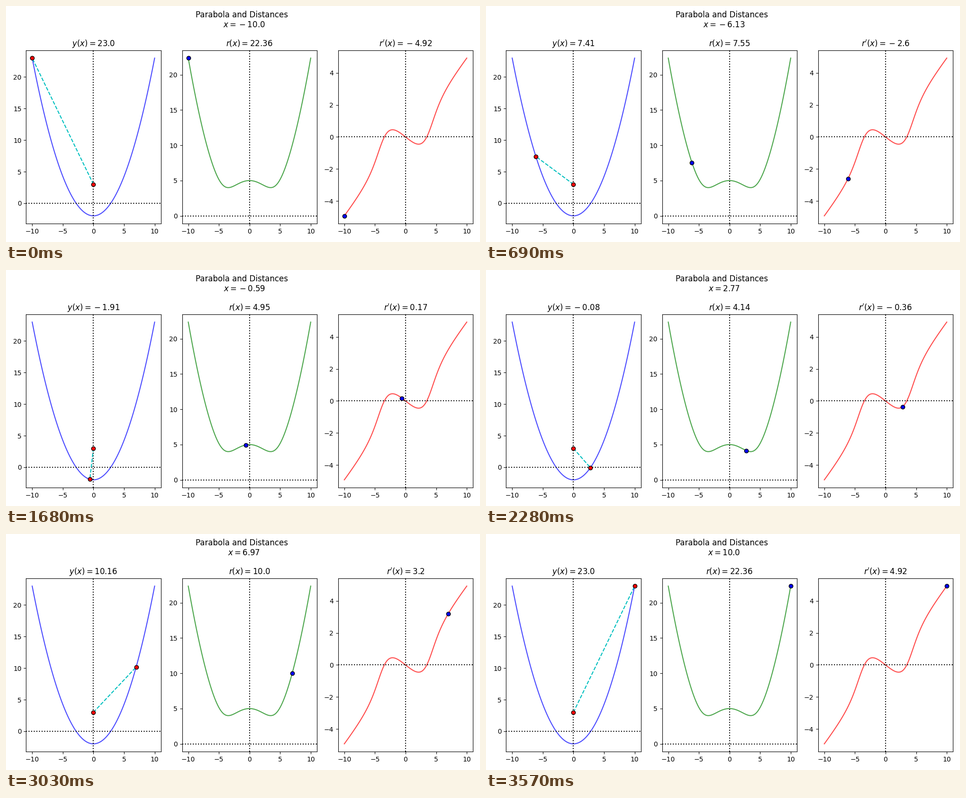
Animation, 1000 px wide and 500 px high, one loop 3600 ms. Source, as a matplotlib script:

```python
import numpy as np
import matplotlib.pyplot as plt
from matplotlib.animation import FuncAnimation

FRAMES = 120
INTERVAL = 30
FOCUS_Y = 3

x = np.linspace(-10, 10, FRAMES)
y = x**2 / 4 - 2
r = np.hypot(x, y - FOCUS_Y)
slope = x * (1 + (y - FOCUS_Y) / 2) / r

fig, axes = plt.subplots(1, 3, figsize=(10, 5), dpi=100)
heading = fig.suptitle("")


def draw_curve(ax, values, color):
    ax.plot(x, values, color=color, alpha=0.7)
    ax.axhline(0, color="k", linestyle=":")
    ax.axvline(0, color="k", linestyle=":")


def add_marker(ax, color, line=""):
    return ax.plot([x[0]], [0], "c" + line, marker="o", linestyle=line or "none",
                   markerfacecolor=color, markeredgecolor="k",
                   scalex=False, scaley=False)[0]


for ax, values, color in zip(axes, (y, r, slope), "bgr"):
    draw_curve(ax, values, color)

segment = add_marker(axes[0], "r", "--")
r_dot = add_marker(axes[1], "b")
slope_dot = add_marker(axes[2], "b")


def label(name, value):
    return f"${name} = {round(float(value), 2)}$"


def update(i):
    segment.set_data([0, x[i]], [FOCUS_Y, y[i]])
    r_dot.set_data([x[i]], [r[i]])
    slope_dot.set_data([x[i]], [slope[i]])
    heading.set_text("Parabola and Distances \n " + label("x", x[i]))
    axes[0].set_title(label("y(x)", y[i]))
    axes[1].set_title(label("r(x)", r[i]))
    axes[2].set_title(label("r'(x)", slope[i]))
    return segment, r_dot, slope_dot


update(0)
fig.tight_layout()

anim = FuncAnimation(fig, update, frames=FRAMES, interval=INTERVAL, repeat=True)
plt.show()
```
